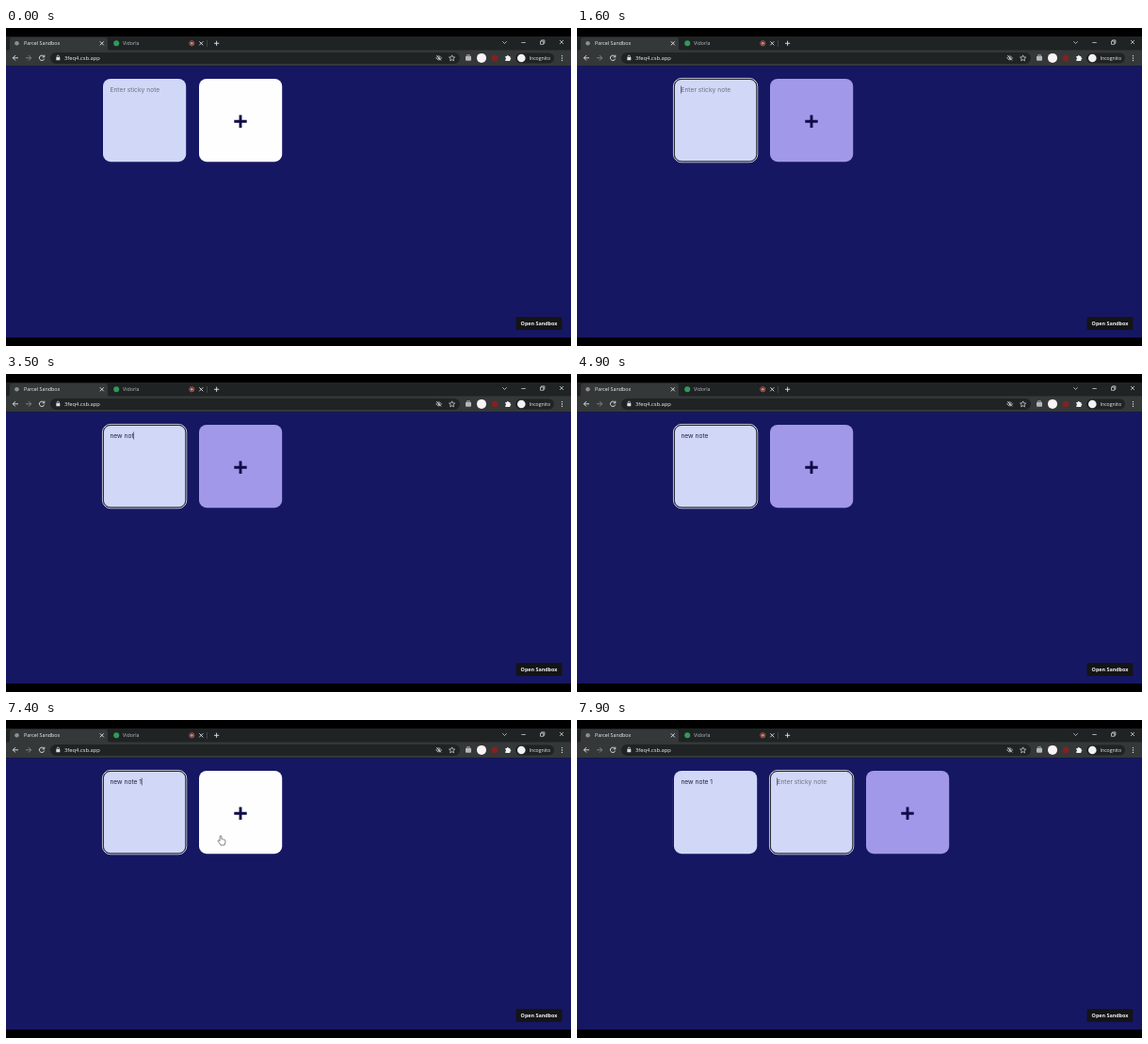
These frames come from a looping animation (600 by 338 pixels, 8000 ms). An HTML page:

```html
<!DOCTYPE html>
<html lang="en">
<head>
<meta charset="utf-8">
<title>Sticky notes</title>
<style>
  html, body { margin: 0; width: 100%; height: 100%; overflow: hidden; background: #000; }
  svg { display: block; width: 100vw; height: 100vh; }
  text { white-space: pre; }
  .ui { font-family: "Open Sans", "Noto Sans", sans-serif; fill: #f0f2f3; }
  .note { font: 6.7px Inter, sans-serif; }
  .line { fill: none; stroke: #e4e6e8; stroke-width: .9; }
  .thin { stroke-width: .7; }
</style>
</head>
<body>
<svg viewBox="0 0 600 338">
  <rect width="600" height="338" fill="#000"/>
  <rect y="9" width="600" height="15" fill="#1f2324"/>
  <path d="M2 24Q4 24 4 21.500V13Q4 10 7 10H105Q108 10 108 13V21.500Q108 24 110 24Z" fill="#343839"/>
  <rect y="23.500" width="600" height="17" fill="#343839"/>
  <rect x="47" y="26" width="435" height="12" rx="6" fill="#1f2324"/>
  <rect y="40.400" width="600" height="288.600" fill="#161763"/>

  <!-- tabs -->
  <g class="ui" font-size="5.350" font-weight="500">
    <circle cx="11.500" cy="16.300" r="2.300" fill="#8b8f91"/>
    <text x="19" y="18.300">Parcel Sandbox</text>
    <circle cx="117.200" cy="16.300" r="3" fill="#2f9a58"/>
    <text x="124" y="18.300" fill="#b9bdbf">Vidorla</text>
    <circle cx="197.300" cy="16.300" r="2.600" fill="none" stroke="#c0695f" stroke-width=".8"/>
    <circle cx="197.300" cy="16.300" r="1.500" fill="#e8857a"/>
    <text x="62" y="34.200" font-size="5.800">3feq4.csb.app</text>
  </g>
  <path class="line" d="M99.800 14.300l4 4m0-4l-4 4M205.300 14.300l4 4m0-4l-4 4M221 16.300h5.200m-2.600-2.600v5.200"/>
  <path d="M213.500 13v7" stroke="#54585a" stroke-width=".6"/>

  <!-- window controls -->
  <path class="line thin" d="M527.300 14.300l2.200 2.200 2.200-2.200M547.300 15.500h4.500M588 13l4 4m0-4l-4 4M567.500 14h3.300v3.300h-3.300zM568.600 14v-1.100h3.300v3.300h-1.100"/>

  <!-- navigation -->
  <path class="line" d="M13 31.800H7.300m2.700-2.700l-2.700 2.700 2.700 2.700M40.300 30.200a2.700 2.700 0 1 0 .4 2.400M40.800 28.700v2.200h-2.200"/>
  <path class="line" style="stroke:#85898b" d="M21 31.800h5.700m-2.700-2.700l2.700 2.700-2.700 2.700"/>
  <rect x="53.300" y="31" width="4" height="3.300" rx=".5" fill="#dcdee2"/>
  <path class="line thin" d="M54.200 31v-.8a1.100 1.100 0 0 1 2.200 0v.8"/>

  <!-- toolbar icons -->
  <path class="line thin" d="M456.700 31.900q2.900-4 5.800 0q-2.900 4-5.800 0zM457.200 29l5 5.500"/>
  <circle cx="459.600" cy="31.900" r="1" fill="#dcdee2"/>
  <path class="line thin" d="M473.600 28.900l.9 2 2.200.2-1.700 1.500.5 2.200-1.900-1.100-1.900 1.100.5-2.200-1.700-1.500 2.200-.2z"/>
  <rect x="488" y="29.700" width="6" height="5" rx="1" fill="#b4b8ba"/>
  <path d="M489.600 29.700v-1h2.800v1" fill="none" stroke="#b4b8ba" stroke-width=".8"/>
  <circle cx="505" cy="31.900" r="5" fill="#fbf4f4"/>
  <circle cx="519" cy="31.900" r="3.200" fill="#86201f"/>
  <path d="M530.300 30h1.500a1 1 0 0 1 2 0h1.500v1.500a1 1 0 0 1 0 2v1.600h-5v-1.700a1 1 0 0 0 0-1.900z" fill="#f0f2f3"/>
  <rect x="541" y="26.500" width="41" height="11" rx="5.500" fill="#1f2324"/>
  <circle cx="547.300" cy="32" r="4.300" fill="#f0f2f3"/>
  <text class="ui" x="555.500" y="33.900" font-size="5.200" font-weight="500">Incognito</text>
  <g fill="#e4e6e8">
    <circle cx="590.500" cy="29.600" r=".7"/><circle cx="590.500" cy="32" r=".7"/><circle cx="590.500" cy="34.400" r=".7"/>
  </g>

  <g id="board"></g>

  <rect x="541.500" y="306.900" width="49" height="14.200" rx="1.500" fill="#141416"/>
  <text class="ui" x="566" y="316.200" text-anchor="middle" font-size="5.400" font-weight="700">Open Sandbox</text>

  <path id="hand" d="M-.9 .9Q-.9 0 0 0T.9 .9V3.600Q1.700 3 2.300 3.900Q3.200 3.400 3.700 4.300Q4.900 4.100 4.900 5.300V7Q4.900 8 4.100 9V10H-.2V9.200Q-1.400 8.200-2.600 6.200Q-3.300 5.100-2.500 4.800Q-1.800 4.600-.9 5.700Z" fill="#fff" stroke="#45454d" stroke-width=".65" stroke-linejoin="round"/>
</svg>
<script>
const LOOP = 8000, STEP = 100;
const LEFT = 103, TOP = 54, SIZE = 88.2, GAP = 102;
const ADDED = 7600;
const PURPLE = [161, 152, 234];
const board = document.getElementById("board");
const hand = document.getElementById("hand");

// [time, typed text length]
const TEXT = "new note 1";
const KEYS = [[1800, 1], [2000, 2], [2200, 3], [2900, 4], [3200, 5], [3300, 6],
              [3500, 7], [3800, 8], [4000, 9], [6300, 10]];
// caret toggles, starting hidden
const BLINKS = [500, 1300, 1500, 2700, 2900, 4500, 5000, 5500, 6000, 6800, 7200];

const clamp = v => Math.max(0, Math.min(1, v));
const ramp = (t, a, b) => clamp((t - a) / (b - a));

function add(tag, attrs, parent) {
  const el = document.createElementNS("http://www.w3.org/2000/svg", tag);
  for (const k in attrs) el.setAttribute(k, attrs[k]);
  return parent.appendChild(el);
}
const show = (el, on) => el.setAttribute("visibility", on ? "inherit" : "hidden");
const slotAt = slot => `translate(${LEFT + slot * GAP} ${TOP})`;

// rounded card outline, grown outwards by `out`
const card = (out, style, parent) =>
  add("rect", { x: -out, y: -out, width: SIZE + 2 * out, height: SIZE + 2 * out, rx: 8 + out, ...style }, parent);

function makeNote(slot) {
  const g = add("g", { transform: slotAt(slot) }, board);
  card(0, { fill: "#d0d7f7" }, g);
  const rings = [
    card(.55, { fill: "none", stroke: "#e6e8f2", "stroke-width": .9 }, g),
    card(-.4, { fill: "none", stroke: "#17191c", "stroke-width": 1 }, g)
  ];
  const label = add("text", { class: "note", x: 7.4, y: 13.8 }, g);
  const caret = add("rect", { y: 7.5, width: .6, height: 8, fill: "#2b2b3c" }, g);

  return ({ text, focus, blink, shown }) => {
    show(g, shown);
    label.textContent = text || "Enter sticky note";
    label.setAttribute("fill", text ? "#23233c" : "#6f7380");
    caret.setAttribute("x", 7.2 + (text ? label.getComputedTextLength() : 0));
    show(caret, focus && blink);
    rings.forEach(r => show(r, focus));
  };
}

const first = makeNote(0);
const second = makeNote(1);

const plus = add("g", {}, board);
const plusCard = card(0, {}, plus);
add("path", { d: "M37.3 45.2H50.7M44 38.5V51.9", stroke: "#100c48", "stroke-width": 2.9 }, plus);

function whiteness(t) {
  if (t < 1000) return 1 - ramp(t, 0, 200);
  if (t < ADDED) return ramp(t, 7200, 7400);
  return 1 - ramp(t, ADDED, 7900);
}

function draw(t) {
  const added = t >= ADDED;
  const typed = KEYS.reduce((n, [at, len]) => t >= at ? len : n, 0);
  const blink = BLINKS.filter(at => t >= at).length % 2 === 1;

  first({ text: TEXT.slice(0, typed), focus: t >= 500 && !added, blink, shown: true });
  second({ text: "", focus: t >= 7700, blink: true, shown: added });

  const w = whiteness(t);
  const rgb = PURPLE.map(c => Math.round(c + (254 - c) * w));
  plusCard.setAttribute("fill", `rgb(${rgb})`);
  plus.setAttribute("transform", slotAt(added ? 2 : 1));

  const p = ramp(t, 7200, 7400);
  hand.setAttribute("transform", `translate(${206 + 22 * p} ${127 - 4 * p})`);
  show(hand, t >= 7200 && !added);
}

const start = performance.now();
function tick(now) {
  const t = Math.max(0, now - start) % LOOP;
  draw(Math.floor(t / STEP) * STEP);
  requestAnimationFrame(tick);
}
draw(0);
requestAnimationFrame(tick);
</script>
</body>
</html>
```
